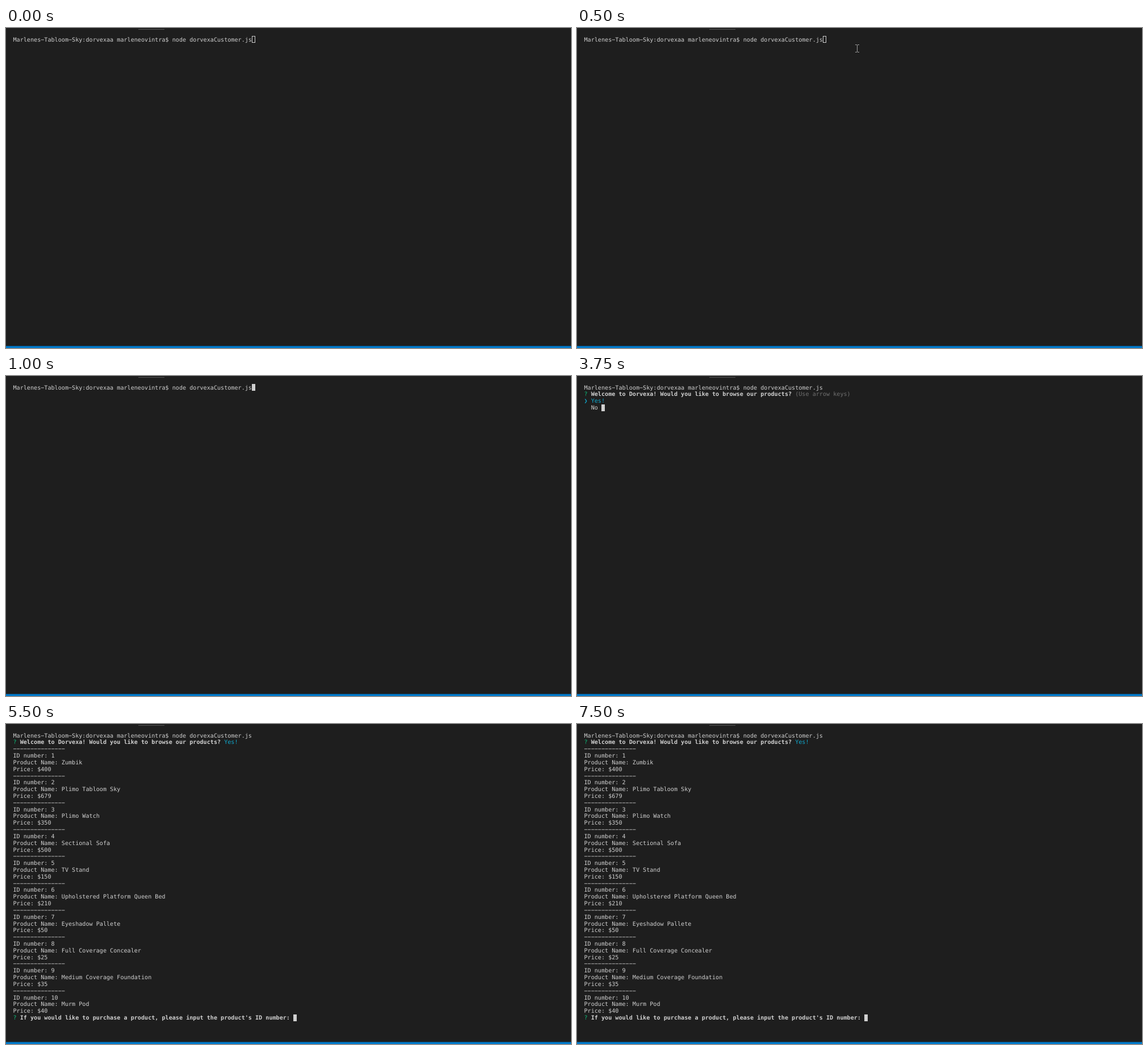
Recreate the animation shown at these times as an HTML page with a canvas. Size 995x563 px, loop 8000 ms.

```html
<!DOCTYPE html>
<html lang="en">
<head>
<meta charset="utf-8">
<title>Terminal shop</title>
<style>
  html, body { margin: 0; width: 100%; height: 100%; overflow: hidden; background: #1e1e1e; }
  canvas { display: block; }
</style>
</head>
<body>
<canvas id="stage"></canvas>
<script>
const W = 995, H = 563, LOOP = 8000;
const LEFT = 12.5, TOP = 14.2, CELL = 6.093, LINE = 11.82, ASCENT = 9.4;
const FG = '#d0d0d0', GREEN = '#0dbc79', CYAN = '#11a8cd', DIM = '#707070';
const FONT = '10.12px "DejaVu Sans Mono", monospace';

const canvas = document.getElementById('stage');
const ctx = canvas.getContext('2d');
const dpr = window.devicePixelRatio || 1;
canvas.width = Math.round(W * dpr);
canvas.height = Math.round(H * dpr);
canvas.style.width = W + 'px';
canvas.style.height = H + 'px';

const PROMPT = 'Marlenes-Tabloom-Sky:dorvexaa marleneovintra$ node dorvexaCustomer.js';
const WELCOME = 'Welcome to Dorvexa! Would you like to browse our products?';
const ASK = "If you would like to purchase a product, please input the product's ID number: ";
const PRODUCTS = [
  ['Zumbik', 400],
  ['Plimo Tabloom Sky', 679],
  ['Plimo Watch', 350],
  ['Sectional Sofa', 500],
  ['TV Stand', 150],
  ['Upholstered Platform Queen Bed', 210],
  ['Eyeshadow Pallete', 50],
  ['Full Coverage Concealer', 25],
  ['Medium Coverage Foundation', 35],
  ['Murm Pod', 40]
];

function rect(x, y, w, h, color) {
  ctx.fillStyle = color;
  ctx.fillRect(x, y, w, h);
}

// Terminal text sits on a fixed grid, one character per cell.
function print(row, col, text, color = FG, bold = false) {
  ctx.font = (bold ? 'bold ' : '') + FONT;
  ctx.fillStyle = color;
  const y = TOP + row * LINE + ASCENT;
  [...text].forEach((ch, i) => {
    if (ch !== ' ') ctx.fillText(ch === '-' ? '\u2212' : ch, LEFT + (col + i) * CELL, y);
  });
}

function caret(row, col, filled = true) {
  const x = Math.round(LEFT + col * CELL);
  const y = Math.round(TOP + row * LINE);
  if (filled) {
    rect(x, y, 6, 12, FG);
  } else {
    ctx.strokeStyle = FG;
    ctx.lineWidth = 1;
    ctx.strokeRect(x + 0.5, y + 0.5, 5, 11);
  }
}

function question(row, text) {
  print(row, 0, '?', GREEN);
  print(row, 2, text, FG, true);
}

function pointer(x, y) {
  const color = '#a0a0a0';
  rect(x + 4, y + 1, 1, 12, color);
  for (const dy of [0, 13]) {
    rect(x + 1, y + dy, 3, 1, color);
    rect(x + 5, y + dy, 3, 1, color);
  }
}

function menu() {
  question(1, WELCOME);
  print(1, WELCOME.length + 3, '(Use arrow keys)', DIM);
  print(2, 0, '❯ Yes!', CYAN);
  print(3, 2, 'No');
  caret(3, 5);
}

function catalogue() {
  question(1, WELCOME);
  print(1, WELCOME.length + 3, 'Yes!', CYAN);
  PRODUCTS.forEach(([name, price], i) => {
    const row = 2 + i * 4;
    print(row, 0, '-'.repeat(15));
    print(row + 1, 0, 'ID number: ' + (i + 1));
    print(row + 2, 0, 'Product Name: ' + name);
    print(row + 3, 0, 'Price: $' + price);
  });
  const last = 2 + PRODUCTS.length * 4;
  question(last, ASK);
  caret(last, ASK.length + 2);
}

function draw(t) {
  ctx.setTransform(dpr, 0, 0, dpr, 0, 0);
  ctx.textBaseline = 'alphabetic';
  ctx.textRendering = 'geometricPrecision';
  rect(0, 0, W, H, '#1e1e1e');
  rect(233, 2, 46, 1, '#555');
  rect(0, 559.5, W, 3.5, '#007acc');
  print(0, 0, PROMPT);

  if (t < 2750) caret(0, PROMPT.length, t >= 750);
  else if (t >= 5500) catalogue();
  else if (t >= 3750) menu();

  if (t >= 250 && t < 500) pointer(484, 61);
  else if (t >= 500 && t < 750) pointer(489, 29);
  else if (t >= 750 && t < 1000) pointer(489, 28);
}

const start = performance.now();
function tick() {
  draw((performance.now() - start) % LOOP);
  requestAnimationFrame(tick);
}
tick();
</script>
</body>
</html>
```
